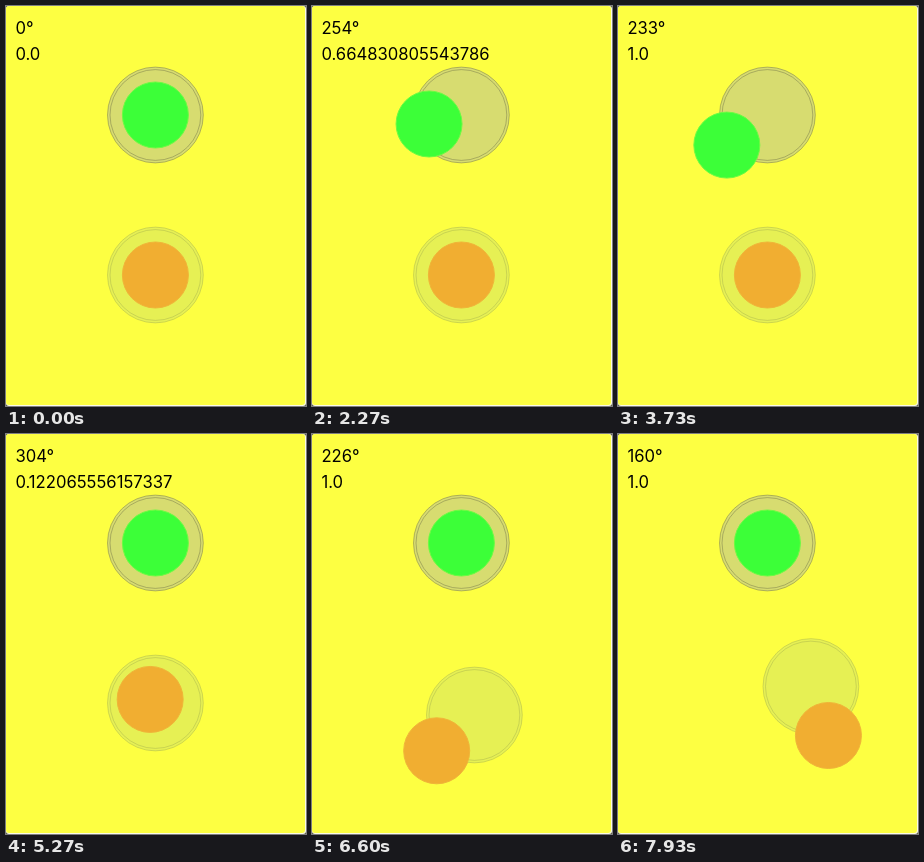
Write an HTML page with a canvas that moves like this. It is 300 by 400 pixels and loops after 8 s.

```html
<!DOCTYPE html>
<html lang="en">
<head>
<meta charset="utf-8">
<title>Two joysticks</title>
<style>
  html, body { margin: 0; width: 100%; height: 100%; overflow: hidden; background: #55563a; }
  canvas { display: block; width: 300px; height: 400px; }
</style>
</head>
<body>
<canvas id="stage"></canvas>
<script>
const W = 300, H = 400, LOOP = 8000, STEPS = 120;
const HOME_X = 149.4;
const canvas = document.getElementById('stage');
const ctx = canvas.getContext('2d');
const ratio = window.devicePixelRatio || 1;
canvas.width = W * ratio;
canvas.height = H * ratio;
ctx.scale(ratio, ratio);

const green = { color: '#3cff38', edge: '#6cfc42', fill: '#d7dc70', ring: 'rgba(120,122,75,0.5)', reach: 50.5 };
const orange = { color: '#f1ae31', edge: '#f0b538', fill: '#e6f054', ring: 'rgba(145,155,75,0.34)', reach: 52 };

const lerp = (a, b, u) => a + (b - a) * u;
const progress = (step, from, to) => Math.min(1, Math.max(0, (step - from) / (to - from)));
const radians = degrees => degrees * Math.PI / 180;

// Angles run clockwise from the top; pull is the share of the full reach.
function place(stick, x, y, angle, pull) {
  const a = radians(angle), d = stick.reach * pull;
  return { stick, x, y, angle, pull, hx: x + Math.sin(a) * d, hy: y - Math.cos(a) * d };
}

// A slow straight pull, then steady fast turns, then a soft return.
function greenPose(step) {
  const angle = 254.5 + 31.77 * Math.max(0, step - 34);
  const slow = 0.664830805543786 * progress(step, 2, 34);
  const back = 1 - progress(step, 57, 71);
  return place(green, HOME_X, 109, angle, lerp(slow, 1, progress(step, 34, 37)) * back ** 3);
}

// A short pull, then slower turns that swing the base along and drag it away.
function orangePose(step) {
  const turned = Math.max(0, step - 79);
  const angle = 304.3 + 13.82 * turned + 0.0145 * turned ** 2;
  const short = 0.122065556157337 * progress(step, 72, 79);
  const pull = lerp(short, 1, progress(step, 79, 85));
  const from = radians(33.3);
  const swing = step < 85 ? from : radians(angle + 5.6);
  const drag = progress(step, 99, 119) ** 3;
  const x = HOME_X + 8.97 * (Math.cos(from) - Math.cos(swing)) + 27.3 * drag;
  const y = 269 + 8.97 * (Math.sin(from) - Math.sin(swing)) - 19.2 * drag;
  return place(orange, x, y, angle, pull);
}

function disc(x, y, r, fill, stroke) {
  ctx.beginPath();
  ctx.arc(x, y, r, 0, Math.PI * 2);
  if (fill) {
    ctx.fillStyle = fill;
    ctx.fill();
  }
  ctx.strokeStyle = stroke;
  ctx.lineWidth = 1;
  ctx.stroke();
}

function drawStick({ stick, x, y, hx, hy }) {
  disc(x, y, 47.9, stick.fill, stick.ring);
  disc(x, y, 45.4, null, stick.ring);
  disc(hx, hy, 33, stick.color, stick.edge);
}

function drawText({ angle, pull }) {
  const degrees = pull ? Math.floor(angle) % 360 : 0;
  const amount = Number.isInteger(pull) ? pull.toFixed(1) : String(pull);
  ctx.font = '16.65px Inter, "Noto Sans", sans-serif';
  ctx.fillStyle = '#000';
  ctx.fillText(degrees + '°', 9.4, 28);
  ctx.fillText(amount, 9.4, 54);
}

function panel(w, h, color) {
  ctx.fillStyle = color;
  ctx.beginPath();
  ctx.roundRect(0, 0, w, h, 3);
  ctx.fill();
}

function draw(elapsed) {
  const time = (elapsed + 4) % LOOP;
  const step = Math.floor(time * STEPS / LOOP);
  ctx.fillStyle = '#55563a';
  ctx.fillRect(0, 0, W, H);
  panel(W, H, '#fbfbe4');
  panel(W - 1, H - 1, '#fdff42');

  const top = greenPose(step);
  const bottom = orangePose(step);
  drawStick(top);
  drawStick(bottom);
  drawText(step < 72 ? top : bottom);
}

const start = performance.now();
function tick() {
  draw(performance.now() - start);
  requestAnimationFrame(tick);
}
tick();
</script>
</body>
</html>
```
